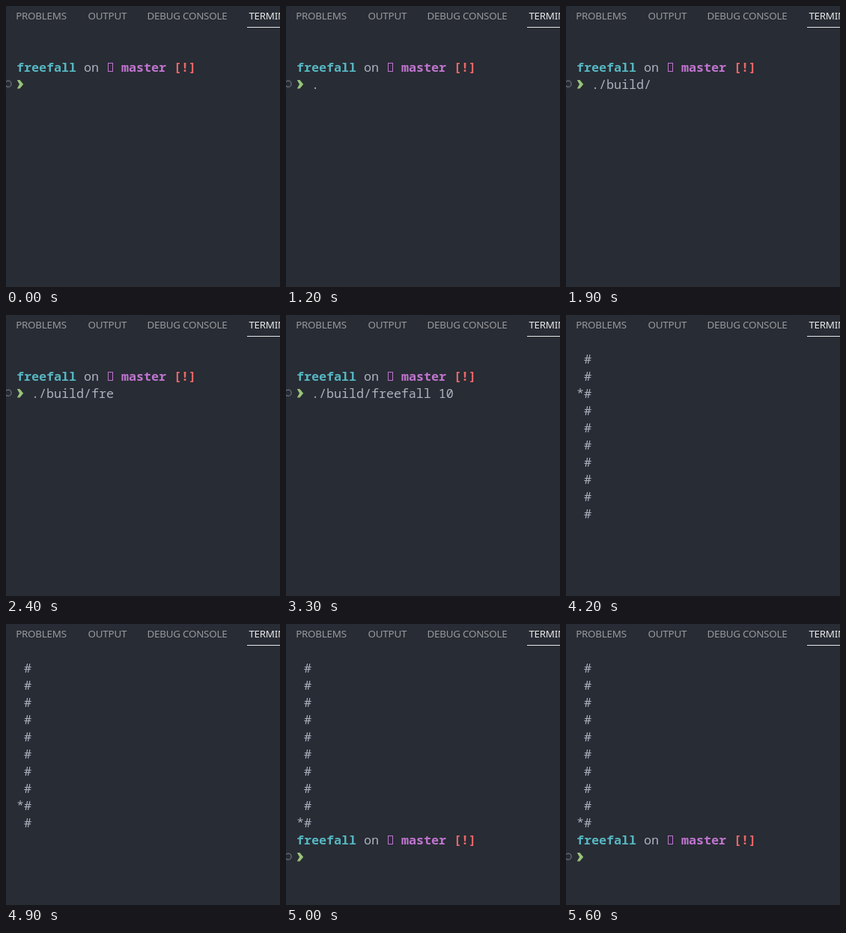
Recreate the animation shown at these times as an HTML page. Size 366 px wide and 376 px high, loop 7.2 s.

```html
<!DOCTYPE html>
<html lang="en">
<head>
<meta charset="utf-8">
<title>Free fall in the terminal</title>
<style>
  html, body { margin: 0; width: 100%; height: 100%; overflow: hidden; background: #282c34; }
  .stage { position: relative; width: 366px; height: 376px; overflow: hidden; background: #282c34; }
  .stage * { position: absolute; left: 0; top: 0; white-space: pre; }

  .stage .tab {
    top: 4px; color: #98999c;
    font: 13.4px/18px "Noto Sans", "Open Sans", sans-serif; letter-spacing: -.25px;
  }
  .stage .active { color: #e7e7e7; }
  .stage .underline { left: 322px; top: 28px; width: 44px; height: 1px; background: #e7e7e7; }

  /* Terminal grid: 10 x 23 px cells */
  .stage .term {
    left: 14px; top: 47px;
    font: 16.8px/23px "Noto Sans Mono", "DejaVu Sans Mono", monospace;
    letter-spacing: -.08px; color: #abb2bf;
  }
  .term .prompt { top: 23px; animation: prompt 7.2s step-end infinite; }
  .term .dir { color: #56b6c2; }
  .term .on { left: 90px; }
  .term .branch { left: 140px; color: #bf74cf; }
  .term .status { left: 210px; color: #ee6868; }
  .term .icon { left: 122px; top: 6px; width: 5px; height: 10px; border: 1px solid #bf74cf; }
  .term .marks { left: -14px; top: 23px; }
  .term .typed { left: 20px; top: 23px; width: 0; overflow: hidden; animation: type 7.2s step-end infinite; }
  .term .tower { left: 10px; animation: tower 7.2s step-end infinite; }
  .term .ball { left: -10px; animation: fall 7.2s step-end infinite; }

  @keyframes prompt {
    0% { visibility: visible; transform: none; }
    48.61% { visibility: hidden; transform: none; }
    69.44%, 100% { visibility: visible; transform: translateY(207px); }
  }
  @keyframes type {
    0% { width: 0; }
    16.66% { width: 10px; }
    18.05% { width: 20px; }
    20.83% { width: 30px; }
    22.22% { width: 40px; }
    26.38% { width: 80px; }
    29.16% { width: 90px; }
    30.55% { width: 100px; }
    33.33% { width: 110px; }
    34.72% { width: 120px; }
    36.11% { width: 130px; }
    37.5% { width: 140px; }
    38.88% { width: 160px; }
    41.66% { width: 190px; }
    48.61%, 100% { width: 0; }
  }
  @keyframes tower {
    0% { visibility: hidden; }
    48.61%, 100% { visibility: visible; }
  }
  @keyframes fall {
    0% { transform: none; }
    55.55% { transform: translateY(23px); }
    58.33% { transform: translateY(46px); }
    59.72% { transform: translateY(69px); }
    61.11% { transform: translateY(92px); }
    62.5% { transform: translateY(115px); }
    65.27% { transform: translateY(138px); }
    66.66% { transform: translateY(161px); }
    68.05% { transform: translateY(184px); }
    69.44%, 100% { transform: translateY(207px); }
  }
</style>
</head>
<body>
<div class="stage">
  <span class="tab" style="left:13.2px">PROBLEMS</span>
  <span class="tab" style="left:109.6px">OUTPUT</span>
  <span class="tab" style="left:188.6px">DEBUG CONSOLE</span>
  <span class="tab active" style="left:324.4px">TERMINAL</span>
  <div class="underline"></div>

  <div class="term">
    <div class="prompt">
      <b class="dir">freefall</b>
      <span class="on">on</span>
      <span class="icon"></span>
      <b class="branch">master</b>
      <b class="status">[!]</b>
      <svg class="marks" width="26" height="23">
        <circle cx="3" cy="11.2" r="4.1" fill="none" stroke="#6c7079" stroke-width="1.3"/>
        <path d="M14.8 6h3.6l4.8 5.8-4.8 5.8h-3.6l3.2-5.8z" fill="#98c379"/>
      </svg>
      <span class="typed">./build/freefall 10</span>
    </div>
    <div class="tower">#
#
#
#
#
#
#
#
#
#<span class="ball">*</span></div>
  </div>
</div>
</body>
</html>
```
